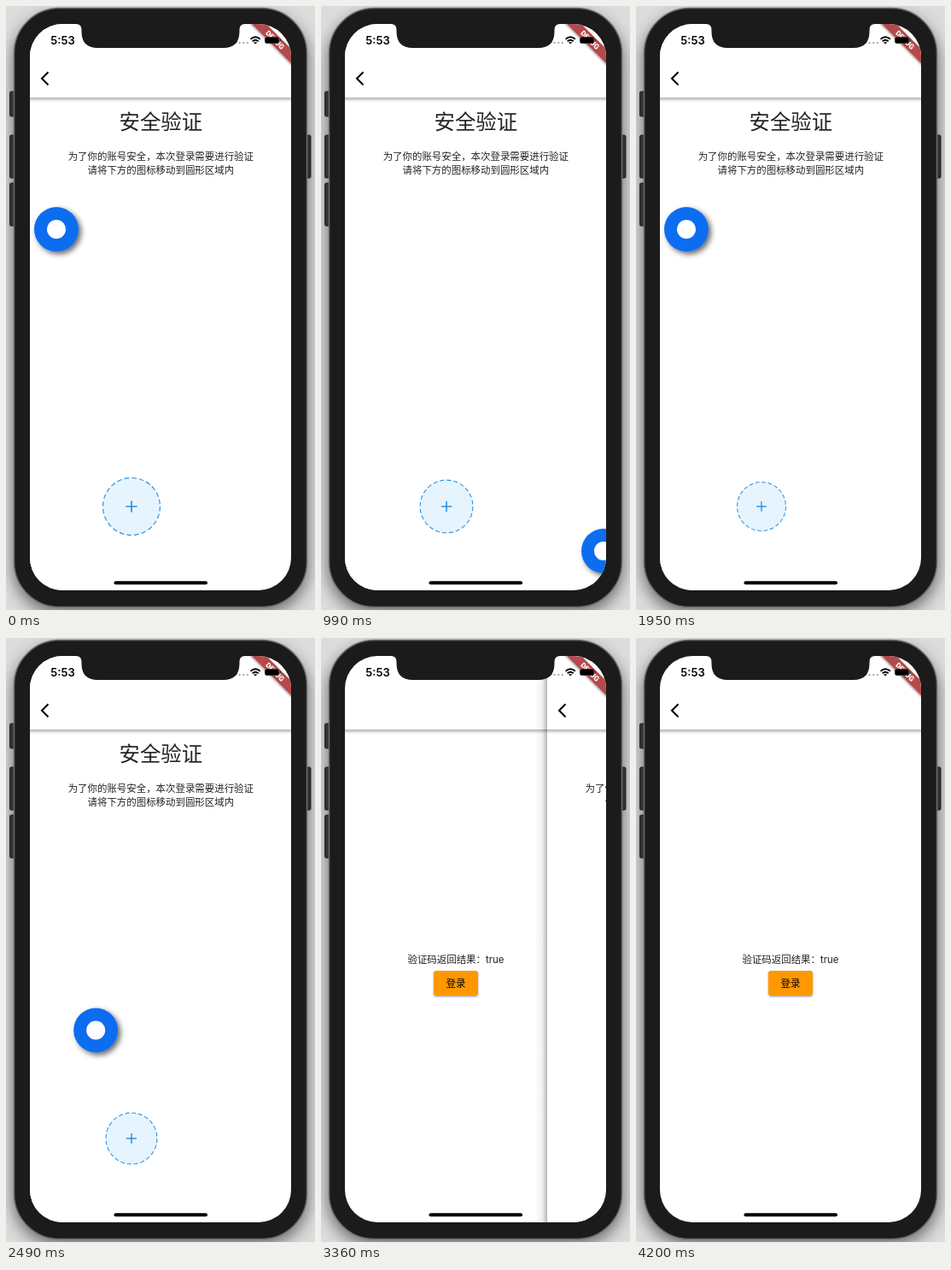
Recreate the animation shown at these times as an HTML page. Size 362 px wide and 706 px high, loop 4320 ms.

```html
<!DOCTYPE html>
<html lang="zh-CN">
<head>
<meta charset="utf-8">
<title>安全验证</title>
<style>
  html, body { margin: 0; width: 100%; height: 100%; overflow: hidden; background: #dcdcdc; }
  svg { display: block; width: 362px; height: 706px; }
  text { font-family: Inter, "Noto Sans CJK SC", "Noto Sans CJK", sans-serif; fill: #222; text-anchor: middle; }
  .title { font-size: 24.4px; }
  .body { font-size: 11.45px; }
  .clock { font-size: 13px; font-weight: 600; fill: #000; }
  .debug { font: 800 8.5px Roboto, sans-serif; fill: #fff; }
</style>
</head>
<body>
<svg viewBox="0 0 362 706">
  <defs>
    <clipPath id="screen"><rect x="28" y="21" width="306" height="662" rx="38"/></clipPath>
    <linearGradient id="barShade" x2="0" y2="1">
      <stop stop-color="#000" stop-opacity=".3"/><stop offset="1" stop-color="#000" stop-opacity="0"/>
    </linearGradient>
    <linearGradient id="edgeShade">
      <stop stop-color="#000" stop-opacity="0"/><stop offset=".6" stop-color="#000" stop-opacity=".06"/>
      <stop offset="1" stop-color="#000" stop-opacity=".3"/>
    </linearGradient>
    <filter id="glow" x="-20%" y="-20%" width="140%" height="140%"><feGaussianBlur stdDeviation="9"/></filter>
    <filter id="drop" x="-50%" y="-50%" width="200%" height="200%">
      <feDropShadow dx="3" dy="3" stdDeviation="3.2" flood-opacity=".6"/>
    </filter>
    <filter id="lift" x="-20%" y="-30%" width="140%" height="170%">
      <feDropShadow dx="0" dy="1.2" stdDeviation="1" flood-opacity=".4"/>
    </filter>
    <g id="blank">
      <rect x="28" y="21" width="306" height="662" fill="#fff"/>
      <rect x="28" y="107" width="306" height="5" fill="url(#barShade)"/>
      <path d="M49.5 77.2 42 84.7l7.500 7.500" fill="none" stroke="#000" stroke-width="2"/>
    </g>
  </defs>

  <!-- phone body -->
  <rect x="8" y="10" width="346" height="700" rx="54" opacity=".5" filter="url(#glow)"/>
  <g fill="#333" stroke="#111" stroke-width=".8">
    <rect x="4.500" y="100" width="7" height="29" rx="1.500"/>
    <rect x="4.500" y="151" width="7" height="50" rx="1.500"/>
    <rect x="4.500" y="207" width="7" height="50" rx="1.500"/>
    <rect x="350" y="151" width="7" height="50" rx="1.500"/>
  </g>
  <rect x="9.500" y="2.500" width="343" height="700" rx="53" fill="#1b1b1b" stroke="#6b6b6b" stroke-width="1.500"/>

  <g clip-path="url(#screen)">
    <g id="result">
      <use href="#blank"/>
      <text class="body" x="181" y="380.300">验证码返回结果：true</text>
      <rect x="155" y="389" width="52" height="29" rx="3" fill="#ff9800" filter="url(#lift)"/>
      <text class="body" x="181" y="407.800" font-weight="500" style="fill:#000">登录</text>
    </g>
    <g id="verify">
      <rect x="14" y="21" width="14" height="662" fill="url(#edgeShade)"/>
      <use href="#blank"/>
      <text class="title" x="181.300" y="144">安全验证</text>
      <text class="body" x="181.300" y="180.300">为了你的账号安全，本次登录需要进行验证</text>
      <text class="body" x="181.300" y="196.300">请将下方的图标移动到圆形区域内</text>
      <g id="target" stroke-width="1.200">
        <circle r="33.500" stroke-dasharray="5.700 3.070"/>
        <path d="M-6.700 0H6.700M0-6.700V6.700" stroke-width="1.700"/>
      </g>
      <g id="ball">
        <circle r="26" fill="#106df0" filter="url(#drop)"/>
        <circle r="11" fill="#fff"/>
      </g>
    </g>

    <!-- debug ribbon and status bar -->
    <g transform="translate(315.200 39.700) rotate(45)">
      <rect x="-50" y="-6" width="100" height="12" fill="#b5484a" filter="url(#lift)"/>
      <text class="debug" y="3">DEBUG</text>
    </g>
    <text class="clock" x="66.500" y="44.500">5:53</text>
    <path d="M268 43h16" stroke="#aaa" stroke-width="2" stroke-dasharray="2 2.600"/>
    <g fill="none" stroke="#000" stroke-width="1.900">
      <path d="M286.500 38.700q5.700-5 11.400 0M288.700 41.200q3.500-3 7 0"/>
      <path d="M290.700 42.700h3l-1.500 1.400z" stroke-width="1"/>
    </g>
    <rect x="303.500" y="36.500" width="16" height="7" rx="2" stroke="#333"/>
    <path d="M321.300 38.500v3" stroke="#333"/>
    <path d="M82 21q6.500 0 6.500 7v2q0 19 19 19h147q19 0 19-19v-2q0-7 6.500-7z" fill="#1b1b1b"/>
    <rect x="126.500" y="672.300" width="109.500" height="4" rx="2"/>
  </g>
</svg>
<script>
const LOOP = 4320, PULSE = 570, WIDTH = 306;
// Spans in which the whole picture stands still
const holds = [[510, 600], [1050, 1140], [1650, 1740], [2250, 2310], [2790, 3090]];
const home = [59, 261], goal = [147, 585];
const $ = id => document.getElementById(id);
const move = (el, x, y, scale = 1) => el.setAttribute('transform', `translate(${x} ${y}) scale(${scale})`);
const clamp = v => Math.min(1, Math.max(0, v));
const easeOut = p => 1 - (1 - p) ** 2;
const easeBoth = p => p * p * (3 - 2 * p);
const mix = (a, b, p) => a.map((v, i) => v + (b[i] - v) * p);

function ballAt(t) {
  if (t < 600) return mix(home, [263, 552], clamp((t - 90) / 510));
  if (t < 1200) return mix([263, 552], [331, 637], easeOut(clamp((t - 600) / 390)));
  return mix(home, [139, 603], easeBoth(clamp((t - 2160) / 600)));
}

function draw(time) {
  const hold = holds.find(([a, b]) => time >= a && time < b);
  const t = hold ? hold[0] : time;

  const [x, y] = ballAt(t);
  move($('ball'), x, y);

  const inside = Math.hypot(x - goal[0], y - goal[1]) < 33;
  const wave = Math.abs(1 - t / PULSE % 2);
  const radius = inside ? 33.5 : 27 + 6.5 * wave ** 1.7;
  const target = $('target');
  move(target, ...goal, radius / 33.5);
  target.setAttribute('fill', inside ? '#e8f6ea' : '#e6f4fe');
  target.setAttribute('stroke', inside ? '#55b35a' : '#2b93e6');

  const slide = easeOut(clamp((t - 3130) / 440));
  move($('verify'), slide * WIDTH, 0);
  $('verify').style.display = slide < 1 ? '' : 'none';
  move($('result'), (slide - 1) * WIDTH / 3, 0);
}

const start = performance.now();
function tick() {
  draw((performance.now() - start) % LOOP);
  requestAnimationFrame(tick);
}
tick();
</script>
</body>
</html>
```
